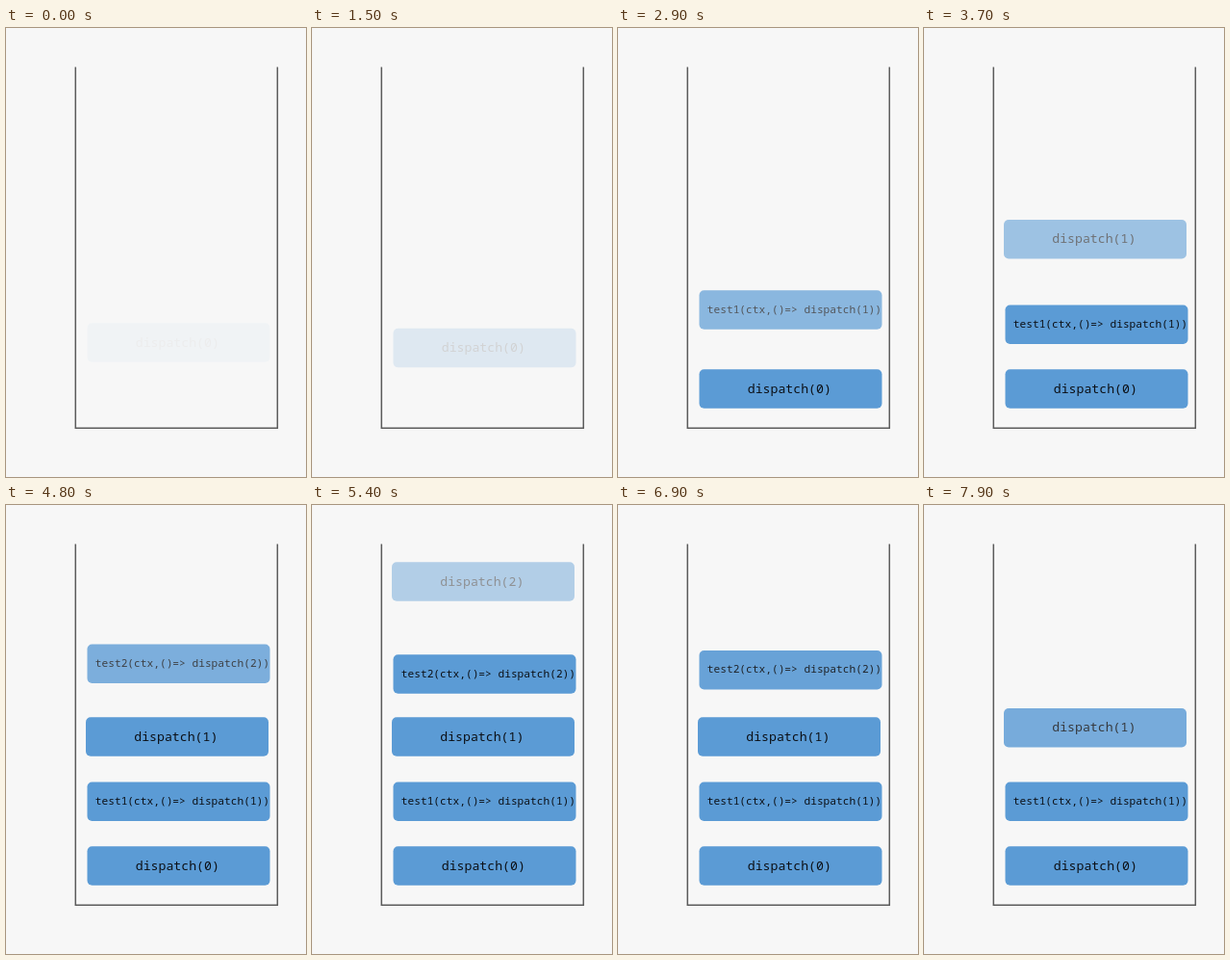
An HTML page that plays this animation: 312 by 466 pixels, repeating every 8 s.

```html
<!DOCTYPE html>
<html lang="en">
<head>
<meta charset="utf-8">
<title>Call stack</title>
<style>
  html, body { margin: 0; height: 100%; overflow: hidden; background: #f7f7f7; }
  svg { display: block; width: 100%; height: 100%; }
  text { font-family: "Noto Sans Mono", "DejaVu Sans Mono", monospace; font-weight: 500; fill: #0c1016; white-space: pre; }
</style>
</head>
<body>
<svg id="stage" viewBox="0 0 312 466">
  <path d="M72.3 40.5V415.2H282.3V40.5" fill="none" stroke="#5c5c5c" stroke-width="1.5"/>
</svg>
<script>
const LOOP = 8000, STEP = 100;
const FIRST_START = 1364, PERIOD = 910, DURATION = 900, RISE = 50;

// Bottom of the stack first
const calls = [
  { label: "dispatch(0)", x: 84.5, y: 354.3 },
  { label: "test1(ctx,()=> dispatch(1))", x: 84.5, y: 287.5, small: true },
  { label: "dispatch(1)", x: 83, y: 220.3 },
  { label: "test2(ctx,()=> dispatch(2))", x: 84.5, y: 155.2, small: true },
  { label: "dispatch(2)", x: 83, y: 87.3 },
];

function add(parent, tag, attributes) {
  const node = document.createElementNS("http://www.w3.org/2000/svg", tag);
  for (const name in attributes) node.setAttribute(name, attributes[name]);
  return parent.appendChild(node);
}

for (const call of calls) {
  call.node = add(document.getElementById("stage"), "g", {});
  add(call.node, "rect", { width: 190, height: 40.5, rx: 5, fill: "#5b9bd5" });
  add(call.node, "text", call.small
    ? { x: 8.3, y: 23.4, "font-size": 11.2 }
    : { x: 50.3, y: 24.4, "font-size": 13.2 }
  ).textContent = call.label;
}

function progress(time, slot) {
  const p = (time - FIRST_START - slot * PERIOD) / DURATION;
  return Math.min(1, Math.max(0, p));
}

function draw(now) {
  const stepped = Math.floor((now % LOOP) / STEP) * STEP;
  const time = Math.max(stepped, 1400);
  calls.forEach(({ node, x, y }, i) => {
    // Calls float in one by one, then leave in reverse order
    const shown = progress(time, i) - progress(time, 2 * calls.length - 1 - i);
    node.setAttribute("opacity", shown);
    node.setAttribute("transform", `translate(${x} ${y - RISE * (1 - shown)})`);
  });
}

const start = performance.now();
function tick() {
  draw(performance.now() - start);
  requestAnimationFrame(tick);
}
tick();
</script>
</body>
</html>
```
